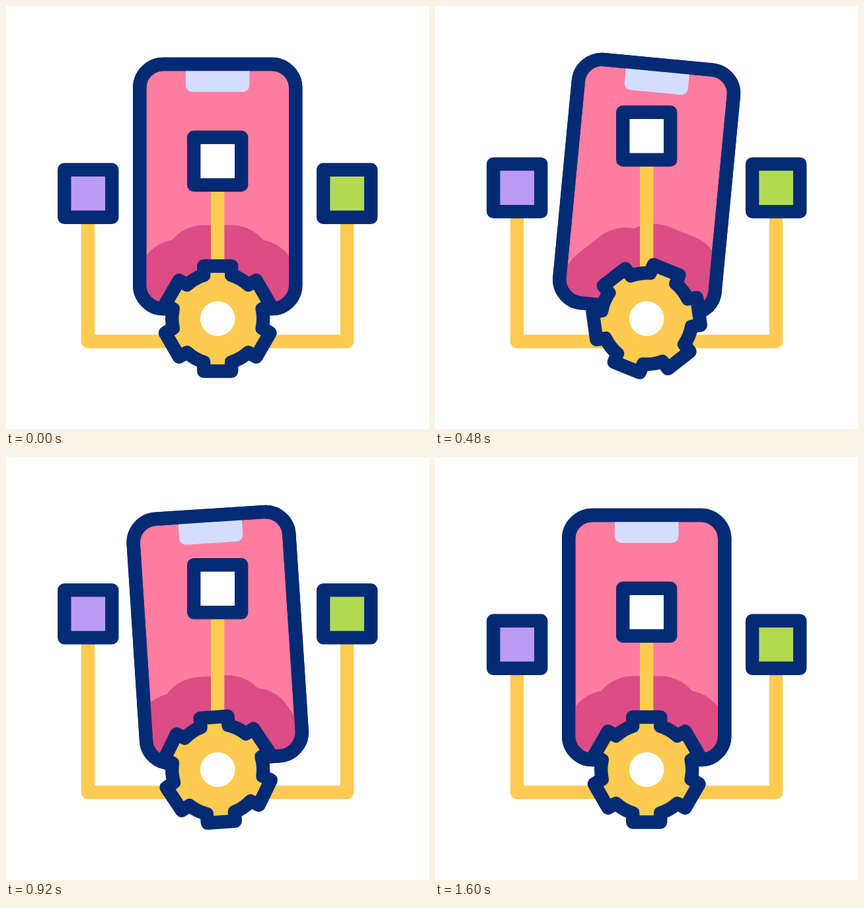
An HTML page with a canvas for the animation above (2 s loop, 640 by 640 pixels).

```html
<!DOCTYPE html>
<html lang="en">
<head>
<meta charset="utf-8">
<title>Phone and gear</title>
<style>
  html, body { margin: 0; height: 100%; overflow: hidden; background: #fff; }
  canvas { display: block; width: 640px; height: 640px; }
</style>
</head>
<body>
<canvas width="640" height="640"></canvas>
<script>
const ctx = document.querySelector('canvas').getContext('2d');
const LOOP = 2000, STEP = 40, LINE = 20.4;
const NAVY = '#032b75', YELLOW = '#fdcb50', PINK = '#ff7da0', SHADE = '#dc4c85';
const GEAR_Y = 473, PHONE_Y = 273, CX = 320.2;

// Symmetric ease in-out, cubic-bezier(.56, 0, .44, 1)
function ease(x) {
  let lo = 0, hi = 1;
  for (let i = 0; i < 24; i++) {
    const s = (lo + hi) / 2, r = 1 - s;
    if (1.68 * s * r * r + 1.32 * s * s * r + s * s * s < x) lo = s; else hi = s;
  }
  return lo * lo * (3 - 2 * lo);
}

// Keys are [time, value] pairs
function track(t, keys) {
  if (t <= keys[0][0]) return keys[0][1];
  for (let i = 1; i < keys.length; i++) {
    const [t0, v0] = keys[i - 1], [t1, v1] = keys[i];
    if (t < t1) return v0 + (v1 - v0) * ease((t - t0) / (t1 - t0));
  }
  return keys[keys.length - 1][1];
}

function gearPath() {
  const half = 21, top = -79.5, body = 69, foot = -Math.sqrt(body ** 2 - half ** 2);
  const path = new Path2D();
  const footAngle = Math.atan2(foot, half);
  for (let k = 0; k < 6; k++) {
    const a = k * Math.PI / 3, c = Math.cos(a), s = Math.sin(a);
    for (const [x, y] of [[-half, foot], [-half, top], [half, top], [half, foot]])
      path.lineTo(x * c - y * s, x * s + y * c);
    const valley = Math.PI / 3 - 2 * (footAngle + Math.PI / 2);
    path.arc(0, 0, body, a + footAngle, a + footAngle + valley);
  }
  path.closePath();
  return path;
}

const gear = gearPath();
const phone = new Path2D();
phone.roundRect(-118, -185, 236, 370, 36);
const notch = new Path2D();
notch.roundRect(-48.2, -185, 96.4, 42, [0, 0, 10, 10]);

function place(x, y, degrees = 0) {
  ctx.setTransform(1, 0, 0, 1, x, y);
  ctx.rotate(degrees * Math.PI / 180);
}

function shape(path, fill, stroke = NAVY, width = LINE) {
  ctx.fillStyle = fill;
  ctx.strokeStyle = stroke;
  ctx.lineWidth = width;
  ctx.fill(path);
  ctx.stroke(path);
}

function wire(...points) {
  place(0, 0);
  ctx.beginPath();
  for (const [x, y] of points) ctx.lineTo(x, y);
  ctx.strokeStyle = YELLOW;
  ctx.lineWidth = LINE;
  ctx.stroke();
}

function box(x, y, fill) {
  place(x, y);
  const square = new Path2D();
  square.rect(-36, -36, 72, 72);
  shape(square, fill);
}

function draw(t) {
  const tilt = track(t, [[30, 0], [430, 5.6], [865, -3.8], [1290, 0]]);
  const spin = track(t, [[35, 0], [1600, 180]]);
  const lift = time => track(time, [[75, 0], [685, 46.5], [1320, 0]]);
  const midY = 234.7 - lift(t), sideY = 283.7 - lift(t - 200);

  place(0, 0);
  ctx.fillStyle = '#fff';
  ctx.fillRect(0, 0, 640, 640);
  ctx.lineJoin = 'round';

  place(CX, PHONE_Y, tilt);
  shape(phone, PINK);
  ctx.fillStyle = '#d4ddff';
  ctx.fill(notch);

  // Gear shadow, kept inside the screen
  ctx.save();
  ctx.clip(phone);
  place(CX, GEAR_Y, spin);
  shape(gear, SHADE, SHADE, 124);
  ctx.restore();

  place(CX, PHONE_Y, tilt);
  ctx.strokeStyle = NAVY;
  ctx.lineWidth = LINE;
  ctx.stroke(phone);

  wire([124, sideY], [124, 507.5], [516, 507.5], [516, sideY]);
  wire([CX, midY], [CX, GEAR_Y]);
  box(124.3, sideY, '#bb9af3');
  box(516.1, sideY, '#b2da51');
  box(CX, midY, '#fff');

  place(CX, GEAR_Y, spin);
  shape(gear, YELLOW);
  ctx.beginPath();
  ctx.arc(0, 0, 26.3, 0, 2 * Math.PI);
  ctx.fillStyle = '#fff';
  ctx.fill();
}

function tick() {
  const t = performance.now() % LOOP;
  draw(Math.floor(t / STEP) * STEP);
  requestAnimationFrame(tick);
}
tick();
</script>
</body>
</html>
```
